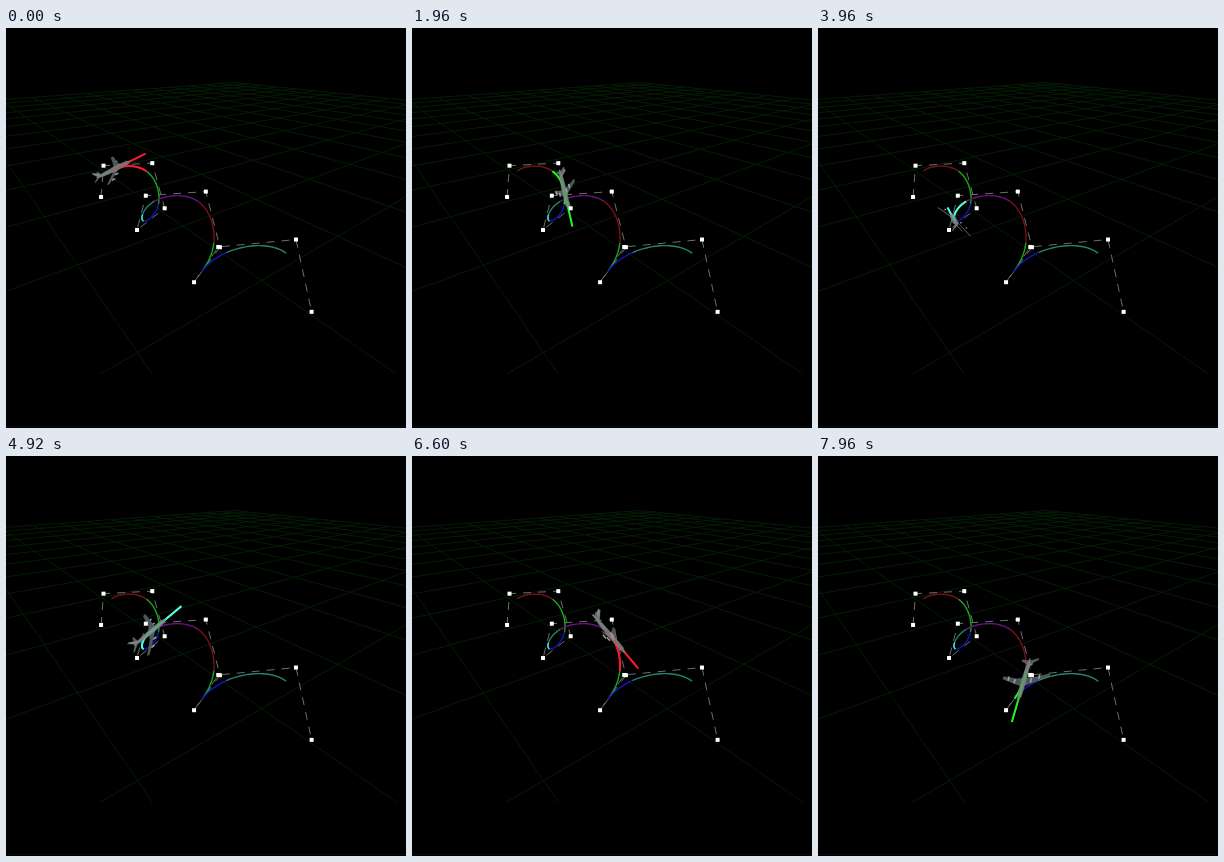
Recreate the animation shown at these times as an HTML page. Size 400 by 400 pixels, loop 8000 ms.

```html
<!DOCTYPE html>
<html lang="en">
<head>
<meta charset="utf-8">
<title>Plane on a B-spline</title>
<style>
html, body { margin: 0; width: 100%; height: 100%; overflow: hidden; background: #000; }
svg { display: block; width: 100%; height: 100%; }
path { fill: none; }
</style>
</head>
<body>
<svg id="stage" viewBox="0 0 400 400"></svg>
<script>
const LOOP = 8000, STEP = 40;
const stage = document.getElementById('stage');

function add(tag, attrs, parent = stage) {
  const el = document.createElementNS('http://www.w3.org/2000/svg', tag);
  for (const k in attrs) el.setAttribute(k, attrs[k]);
  parent.appendChild(el);
  return el;
}
const toPath = pts => 'M' + pts.map(p => p[0].toFixed(2) + ' ' + p[1].toFixed(2)).join('L');

// Vectors
const plus = (a, b, k = 1) => a.map((v, i) => v + k * b[i]);
const cross = (a, b) => [a[1] * b[2] - a[2] * b[1], a[2] * b[0] - a[0] * b[2], a[0] * b[1] - a[1] * b[0]];
const unit = a => { const n = Math.hypot(...a); return a.map(v => v / n); };

// Camera: world origin and world axes in view space
const FOCAL = 296, ORIGIN = [-26.2, -7.74, 73.9];
const AXES = [[0.794, -0.311, 0.522], [0.045, -0.859, -0.512], [0.608, 0.407, -0.682]];
const toView = p => p.reduce((v, c, i) => plus(v, AXES[i], c), ORIGIN);
function project(p) {
  const [x, y, z] = toView(p);
  return [200 + FOCAL * x / z, 200 + FOCAL * y / z];
}

// Floor grid: two families of lines, each through its own vanishing point
const HORIZON = 23.5, FLOOR_END = 346, LEFT_VP = -75, RIGHT_VP = 650;
const S0 = 9.77, DS = 0.757, T0 = 13.59, DT = 0.989, CELLS = 12;
function floorLine(vp, slope, far) {
  const depth = FLOOR_END - HORIZON;
  return toPath([[vp + slope * far, HORIZON + far], [vp + slope * depth, FLOOR_END]]);
}
let grid = '';
for (let k = 0; k <= CELLS; k++) {
  const s = S0 - DS * k, t = T0 - DT * k, span = RIGHT_VP - LEFT_VP;
  grid += floorLine(LEFT_VP, s, span / (s + T0)) + floorLine(RIGHT_VP, -t, span / (t + S0));
}
add('path', { d: grid, stroke: '#041c04', 'stroke-width': 1 });
add('rect', { y: 398, width: 400, height: 1, fill: '#0b0b0b' });

// Control points: a square spiral, four corners per turn
const SIZE = 9.45, RISE = 5;
const ctrl = Array.from({ length: 12 }, (_, i) => [
  i % 4 > 1 ? SIZE : 0,
  i % 4 === 1 || i % 4 === 2 ? SIZE : 0,
  RISE * i
]);
const SEGS = ctrl.length - 3;

// Uniform cubic B-spline and its derivatives
const blend = (i, w) => w.reduce((sum, v, j) => plus(sum, ctrl[i + j], v), [0, 0, 0]);
function pointAt(i, u) {
  return blend(i, [(1 - u) ** 3 / 6, (3 * u ** 3 - 6 * u * u + 4) / 6,
    (-3 * u ** 3 + 3 * u * u + 3 * u + 1) / 6, u ** 3 / 6]);
}
function slopeAt(i, u) {
  const a = (1 - u) ** 2 / 2, c = u * u / 2, b = 1 - a - c;
  return blend(i, [-a, a - b, b - c, c]);
}
const bendAt = (i, u) => blend(i, [1 - u, 3 * u - 2, 1 - 3 * u, u]);

function curve(i, to = 1) {
  const pts = [];
  for (let k = 0; k <= 24; k++) pts.push(project(pointAt(i, to * k / 24)));
  return toPath(pts);
}

const dim = ['#7c0f18', '#18a81c', '#1414c0', '#248474', '#6c1280'];
const bright = ['#ff1830', '#22f522', '#1c1cff', '#50ffe4', '#ff14ff'];
const corners = ctrl.map(project);

add('path', { d: toPath(corners), stroke: '#68726c', 'stroke-width': 1, 'stroke-dasharray': '8 7' });
for (let i = 0; i < SEGS; i++) {
  add('path', { d: curve(i), stroke: dim[i % 5], 'stroke-width': 1.4 });
}
add('path', { d: curve(3, 0.45), stroke: '#3fdce0', 'stroke-width': 1.5 });

const active = add('path', { 'stroke-width': 2 });
const tangent = add('path', { 'stroke-width': 2 });
const plane = add('g', {});
const glow = add('path', { 'stroke-width': 1.6, opacity: 0.3 });
for (const [x, y] of corners) add('rect', { x: x - 2, y: y - 2, width: 4, height: 4, fill: '#fff' });

// Plane model: forward, right, up, in half lengths
const HALF_LENGTH = 4.6;
const wing = [[0.34, 0, 0], [-0.12, 0.98, 0.05], [-0.24, 0.98, 0.05], [-0.04, 0.3, 0], [-0.08, 0, 0]];
const stab = [[-0.74, 0, 0.03], [-1, 0.36, 0.05], [-1.07, 0.36, 0.05], [-0.95, 0, 0.03]];
const fin = [[-0.7, 0, 0.05], [-0.98, 0, 0.32], [-1.08, 0, 0.32], [-0.98, 0, 0.05]];
const pod = r => [[0.4 - r * 0.5, r, -0.08], [0.2 - r * 0.5, r, -0.08]];
const mirror = pts => pts.map(([f, r, u]) => [f, -r, u]);

const parts = [];
function part(layer, pts, attrs, end = 'Z') {
  parts.push({ pts, end, el: add('path', attrs, layer) });
}
const skin = fill => ({ style: 'fill:' + fill, stroke: '#76827f', 'stroke-width': 0.4 });
const lower = add('g', {}, plane), middle = add('g', {}, plane), upper = add('g', {}, plane);
for (const flip of [pts => pts, mirror]) {
  part(middle, flip(wing), skin('#4a5657'));
  part(middle, flip(stab), skin('#525e5e'));
  for (const r of [0.34, 0.64]) part(lower, flip(pod(r)), { stroke: '#9aa6a3', 'stroke-width': 1.5 }, '');
}
part(upper, fin, skin('#7c8683'));
const body = add('path', skin('#757f7c'), middle);

// Body outline: distance along the axis, half width in pixels
const hull = [[-1.05, 0.4], [-0.6, 1.7], [0.1, 2.3], [0.75, 2], [1, 0]];

function draw(ms) {
  const p = 0.1 + 0.767 * ms / 1000;
  const i = Math.floor(p), u = p - i;
  const pos = pointAt(i, u), slope = slopeAt(i, u);
  const line = toPath([pos, plus(pos, slope)].map(project));
  const color = bright[i % 5];

  active.setAttribute('d', curve(i));
  tangent.setAttribute('d', line);
  glow.setAttribute('d', curve(i) + line);
  for (const el of [active, tangent, glow]) el.setAttribute('stroke', color);

  // Wings lie along the binormal, the belly faces the inside of the bend
  const ahead = unit(slope), right = unit(cross(slope, bendAt(i, u))), up = cross(ahead, right);
  const place = ([f, r, h]) => {
    const off = plus(plus(ahead.map(v => v * f), right, r), up, h);
    return project(plus(pos, off, HALF_LENGTH));
  };
  for (const { pts, end, el } of parts) el.setAttribute('d', toPath(pts.map(place)) + end);

  const [nose, tail] = [1, -1].map(f => place([f, 0, 0]));
  const dx = nose[0] - tail[0], dy = nose[1] - tail[1], n = Math.hypot(dx, dy) || 1;
  const side = sign => hull.map(([f, w]) => {
    const [x, y] = place([f, 0, 0]);
    return [x + sign * w * dy / n, y - sign * w * dx / n];
  });
  body.setAttribute('d', toPath(side(1).concat(side(-1).reverse())) + 'Z');

  // Paint the far side first
  const topIsNear = toView(plus(pos, up))[2] < toView(pos)[2];
  plane.append(...(topIsNear ? [lower, middle, upper] : [upper, middle, lower]));
}

const start = performance.now();
function tick(now) {
  const ms = Math.max(0, now - start) % LOOP;
  draw(Math.floor(ms / STEP) * STEP);
  requestAnimationFrame(tick);
}
draw(0);
requestAnimationFrame(tick);
</script>
</body>
</html>
```
